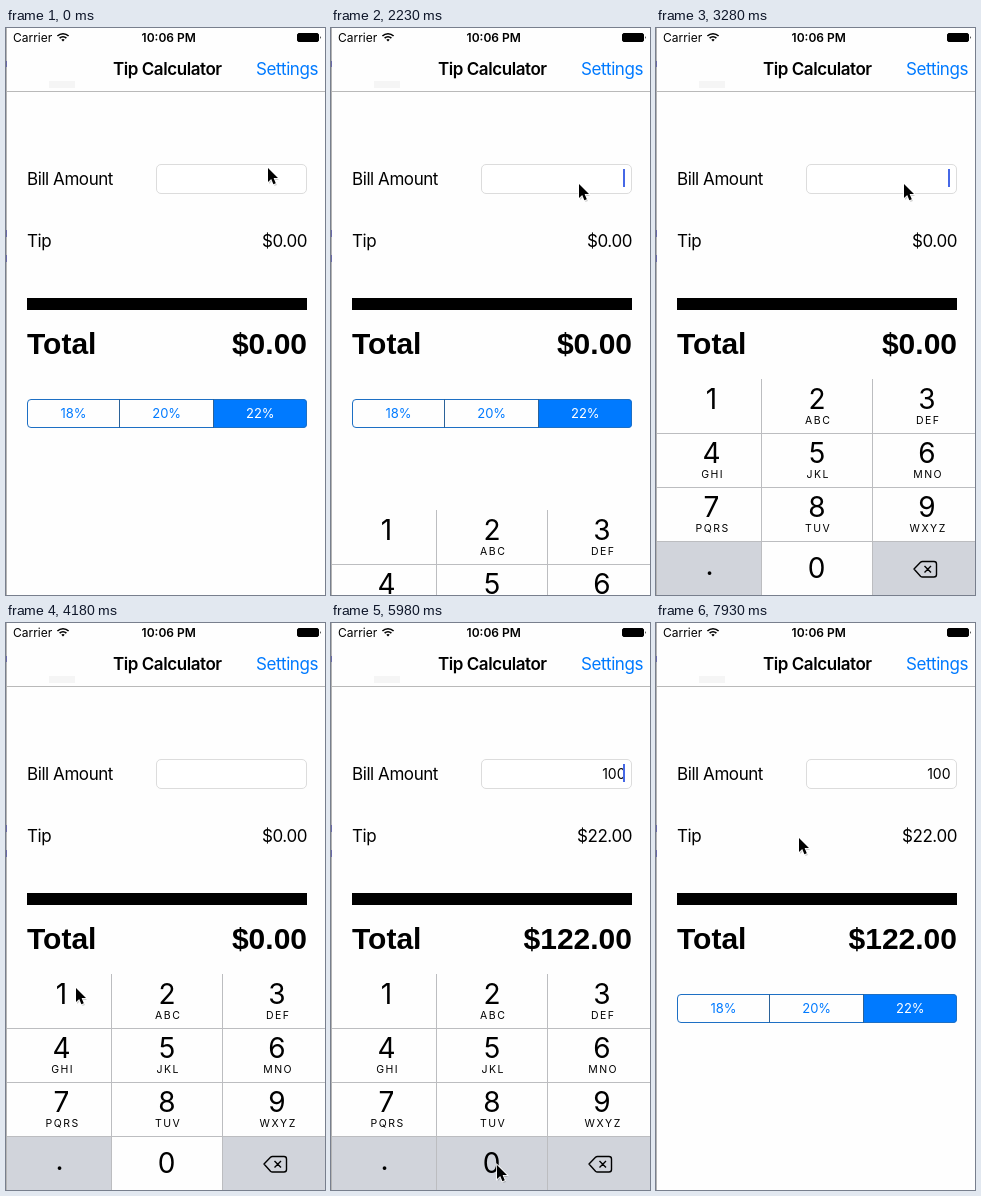
An HTML page for the animation above (8000 ms loop, 319 by 567 pixels).

```html
<!DOCTYPE html>
<html lang="en">
<head>
<meta charset="utf-8">
<title>Tip Calculator</title>
<style>
  html, body { margin: 0; width: 100%; height: 100%; overflow: hidden; background: #fefefe; }
  svg { display: block; width: 100vw; height: 100vh; }
  text { font-family: Inter, Roboto, sans-serif; font-size: 17px; letter-spacing: -.43px; white-space: pre; }
  .status { font-size: 12px; letter-spacing: 0; }
  .strong { font-weight: 600; }
  .total { font: bold 30px "Liberation Sans", sans-serif; letter-spacing: 0; }
  .field { font-size: 14px; letter-spacing: 0; }
  .segment { font-size: 13px; letter-spacing: 0; fill: #007aff; }
  .digit { font-size: 28px; letter-spacing: 0; }
  .letters { font-size: 10.5px; letter-spacing: 1.5px; }
  .mid { text-anchor: middle; }
  .end { text-anchor: end; }
</style>
</head>
<body>
<svg viewBox="0 0 319 567">
  <rect width="319" height="567" fill="#fefefe"/>

  <!-- Status and navigation bars -->
  <path d="M43 53h26v7h-26z" fill="#f5f5f5"/>
  <path d="M0 63.5H319" stroke="#b9b9b9"/>
  <text class="status" x="7" y="14">Carrier</text>
  <g fill="none" stroke="#000" stroke-width="1.6">
    <path d="M51.4 8A8 8 0 0 1 62.6 8M53.6 10.2A5 5 0 0 1 60.4 10.2"/>
    <path d="M57 13.5L55.3 11.7A2.5 2.5 0 0 1 58.7 11.7Z" fill="#000" stroke="none"/>
  </g>
  <text class="status strong mid" x="162.7" y="14">10:06 PM</text>
  <rect x="291.5" y="5.5" width="21" height="8" rx="1.5" stroke="#000"/>
  <path d="M314 8q1.6 1.5 0 3z"/>
  <text class="strong mid" x="161.3" y="47">Tip Calculator</text>
  <text class="end" x="312" y="47" fill="#007aff">Settings</text>

  <!-- Bill form -->
  <text x="21" y="157">Bill Amount</text>
  <rect x="150.5" y="136.5" width="150" height="29" rx="4.5" fill="#fff" stroke="#dcdcdc"/>
  <text class="field end" id="bill" x="294.5" y="156"></text>
  <rect id="caret" x="292" y="141" width="2" height="18" fill="#4668e6"/>
  <text x="21" y="219">Tip</text>
  <text class="end" id="tip" x="301" y="219"></text>
  <rect x="21" y="270" width="280" height="12"/>
  <text class="total" x="21" y="326">Total</text>
  <text class="total end" id="total" x="301" y="326"></text>

  <!-- Tip rate selector -->
  <path d="M207 371h90q4 0 4 4v21q0 4-4 4h-90z" fill="#007aff"/>
  <rect x="21.5" y="371.5" width="279" height="28" rx="3.5" fill="none" stroke="#1d6fc4"/>
  <path d="M113.5 371V400M207.5 371V400" stroke="#2b6299"/>
  <text class="segment mid" x="67.5" y="390">18%</text>
  <text class="segment mid" x="160.7" y="390">20%</text>
  <text class="segment mid" x="254.3" y="390" style="fill:#fff">22%</text>

  <g id="keyboard"></g>

  <path d="M.5 0V567" stroke="#b4b4b4"/>
  <path d="M0 33h1v6h-1zM0 202h1v7h-1zM0 227h1v7h-1z" fill="#6b6ba8"/>

  <g id="pointer">
    <path d="M1 2V16L4.2 13 6.5 18 9 17 6.8 12H11Z" fill="#000" opacity=".18"/>
    <path d="M0 0V14L3.2 11 5.4 16.2 7.8 15.2 5.6 10H10Z" stroke="#fff" stroke-width="1.6" paint-order="stroke"/>
  </g>
</svg>
<script>
const LOOP = 8000, STEP = 150, FIRST = 280, TIP_RATE = 0.22;
const $ = id => document.getElementById(id);

function buildKeyboard() {
  const centers = [55.5, 161, 271];
  const letters = ["", "ABC", "DEF", "GHI", "JKL", "MNO", "PQRS", "TUV", "WXYZ"];
  const keys = letters.map((word, i) => {
    const x = centers[i % 3], y = 351 + 54 * Math.floor(i / 3);
    return `<text class="digit mid" x="${x}" y="${y + 30}">${i + 1}</text>
      <text class="letters mid" x="${x + 1.2}" y="${y + 45}">${word}</text>`;
  });
  $("keyboard").innerHTML = `
    <rect y="351" width="319" height="216" fill="#fefefe"/>
    <path d="M0 513H105V567H0zM217 513H319V567H217z" fill="#d1d4db"/>
    <rect id="zero" x="106" y="513" width="110" height="54"/>
    <path d="M105.5 351V567M216.5 351V567M0 405.5H319M0 459.5H319M0 513.5H319" stroke="#bcbdc0"/>
    ${keys.join("")}
    <text class="digit mid" x="53.5" y="547">.</text>
    <text class="digit mid" x="160.5" y="550">0</text>
    <path d="M258 541L264.5 534.3Q265.3 533.5 266.5 533.5H278Q280.5 533.5 280.5 536V546.5Q280.5 549 278 549H266.5Q265.3 549 264.5 548.2ZM268.5 538L275 544.5M275 538L268.5 544.5"
      fill="none" stroke="#000" stroke-width="1.4" stroke-linejoin="round"/>`;
}

// time, x, y of the pointer tip
const pointerPath = [
  [0, 262, 140], [130, 262, 140], [430, 243, 152], [580, 223, 161], [730, 233, 162],
  [1030, 233, 162], [1780, 248, 156], [3280, 248, 156], [4180, 70, 365],
  [4480, 70, 365], [5080, 167, 542], [5380, 167, 542], [5530, 166, 542],
  [6280, 166, 542], [7180, 143, 215], [LOOP, 143, 215]
];
const caretSpans = [[2080, 2830], [3280, 3730], [4330, 4780], [5380, 6580], [7030, 7630]];

function pointerAt(t) {
  const i = pointerPath.findIndex(key => key[0] > t);
  const [t0, x0, y0] = pointerPath[i - 1], [t1, x1, y1] = pointerPath[i];
  const p = (t - t0) / (t1 - t0), eased = p * p * (3 - 2 * p);
  return [x0 + (x1 - x0) * eased, y0 + (y1 - y0) * eased];
}

// Critically damped spring, 0 to 1
function spring(ms) {
  const x = Math.max(0, ms) * 0.0183;
  return 1 - (1 + x) * Math.exp(-x);
}

const money = value => "$" + value.toFixed(2);

function draw(now) {
  const time = now % LOOP;
  // The screen refreshes in discrete steps
  const t = time < FIRST + 10 ? 0 : FIRST + STEP * Math.floor((time - FIRST) / STEP);
  const bill = t < 4330 ? "" : t < 5380 ? "1" : t < 5980 ? "10" : "100";
  const tip = bill * TIP_RATE;
  $("bill").textContent = bill;
  $("tip").textContent = money(tip);
  $("total").textContent = money(+bill + tip);

  const caretOn = caretSpans.some(([on, off]) => t >= on && t < off);
  $("caret").setAttribute("visibility", caretOn ? "visible" : "hidden");
  const drop = 218 * (1 - spring(t - 2155) + spring(t - 7545));
  $("keyboard").setAttribute("transform", `translate(0 ${Math.round(drop)})`);
  $("zero").setAttribute("fill", t >= 5980 && t < 6130 ? "#d1d4db" : "#fefefe");
  $("pointer").setAttribute("transform", `translate(${pointerAt(t)})`);
}

buildKeyboard();
let start;
function tick(now) {
  start ??= now;
  draw(now - start);
  requestAnimationFrame(tick);
}
draw(0);
requestAnimationFrame(tick);
</script>
</body>
</html>
```
